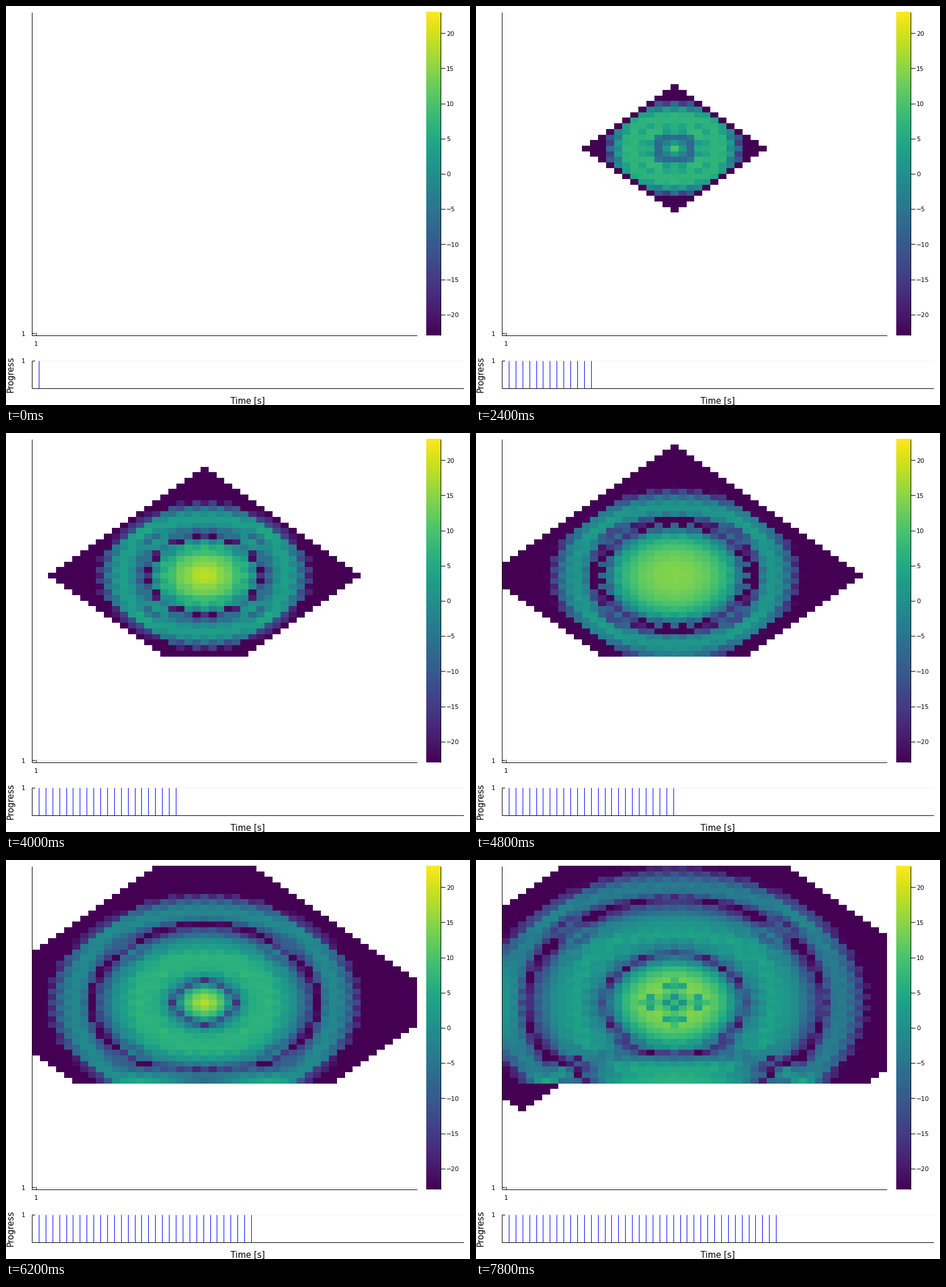
A matplotlib script that plays this animation: 806x694 px, repeating every 8 s.

```python
import numpy as np
import matplotlib.pyplot as plt
from matplotlib.animation import FuncAnimation

W, H, DPI = 806, 694, 100
PX = 72 / DPI
FRAMES, INTERVAL = 40, 200

# room: rows (from the bottom), columns, depth
ROWS, COLS, DEPTH = 58, 48, 46
SRC = (33, 21, 22)
SLICE = 24
WALL_ROW, GAP_COL = 18, 2
COURANT = 1 / np.sqrt(3)
PERIOD, GAIN, GROWTH = 33, 373, 0.015
LIMIT = 23

LEFT, RIGHT, TOP, BOTTOM = 45, 714, 10.5, 573.4
BAR_TOP, BAR_BOTTOM, BAR_RIGHT = 616.5, 665, 795
BAR_STEP = (BAR_RIGHT - LEFT) / 63


def burst(n):
    """One sine period with a slowly rising level."""
    if n >= PERIOD - 1:
        return 0.0
    level = GAIN * np.exp(GROWTH * (n - 16))
    return level * np.sin(2 * np.pi * (n + 1.05) / PERIOD)


def simulate():
    """Sound pressure level in one plane of the room for each frame."""
    p = np.zeros((ROWS, COLS, DEPTH))
    vel = [np.zeros_like(np.diff(p, axis=a)) for a in range(3)]
    wall = np.arange(COLS) != GAP_COL
    levels = []
    p[SRC] += burst(-1)
    for n in range(FRAMES):
        for a in range(3):
            vel[a] -= COURANT * np.diff(p, axis=a)
        vel[0][WALL_ROW, wall] = 0
        for a in range(3):
            p -= COURANT * np.diff(vel[a], axis=a, prepend=0, append=0)
        p[SRC] += burst(n)
        plane = np.abs(p[:, :, SLICE])
        plane = np.where(plane > 0, plane, np.nan)
        levels.append(np.ma.masked_invalid(20 * np.log10(plane)))
    levels[0][:] = np.ma.masked
    return levels


levels = simulate()

fig = plt.figure(figsize=(W / DPI, H / DPI), dpi=DPI, facecolor="white")
ax = fig.add_axes([0, 0, 1, 1])


def line(x0, y0, x1, y1, color="black", z=5):
    ax.plot([x0, x1], [y0, y1], color=color, lw=PX, zorder=z,
            solid_capstyle="butt")


def label(x, y, text, px=10.67, ha="center", **kw):
    ax.text(x, y, text, fontsize=px * PX, family="DejaVu Sans", ha=ha,
            va="center_baseline" if not kw else "center", color="black", **kw)


def picture(data, extent):
    return ax.imshow(data, extent=extent, origin="lower", aspect="auto",
                     cmap="viridis", vmin=-LIMIT, vmax=LIMIT,
                     interpolation="nearest", zorder=2)


heat = picture(levels[0], (LEFT, RIGHT, BOTTOM, TOP))
ramp = np.linspace(-LIMIT, LIMIT, 256)[:, None]
picture(ramp, (730, 754.5, BOTTOM, TOP))

# main axes
tick_x = LEFT + (RIGHT - LEFT) / COLS / 2
tick_y = BOTTOM - (BOTTOM - TOP) / ROWS / 2
FAINT = "#f2f2f2"
line(tick_x, TOP, tick_x, BOTTOM, FAINT, 1)
line(LEFT, tick_y, RIGHT, tick_y, FAINT, 1)
line(LEFT, TOP, LEFT, BOTTOM)
line(LEFT, BOTTOM, RIGHT, BOTTOM)
line(tick_x, BOTTOM, tick_x, BOTTOM - 5)
line(LEFT, tick_y, LEFT + 5, tick_y)
label(tick_x, 587, "1")
label(30.5, 569.5, "1")

# colour bar
line(754.5, TOP, 754.5, BOTTOM)
for v in range(-20, 21, 5):
    y = (TOP + BOTTOM) / 2 - v * (BOTTOM - TOP) / (2 * LIMIT)
    line(754.5, y, 763, y)
    label(765, y + 0.3, str(v).replace("-", "\u2212"), ha="left")

# progress axes
line(LEFT, BAR_TOP, BAR_RIGHT, BAR_TOP, FAINT, 1)
line(LEFT, BAR_TOP, LEFT, BAR_BOTTOM)
line(LEFT, BAR_BOTTOM, BAR_RIGHT, BAR_BOTTOM)
line(LEFT, BAR_TOP, LEFT + 5, BAR_TOP)
label(30.5, 617, "1")
label(420, 685.5, "Time [s]", 14.67)
label(8.5, 641, "Progress", 14.67, rotation=90)
bars = ax.vlines([], BAR_TOP, BAR_BOTTOM, colors="blue", lw=PX, zorder=4)

ax.set_xlim(0, W)
ax.set_ylim(H, 0)
ax.axis("off")


def update(n):
    heat.set_data(levels[n])
    xs = LEFT + BAR_STEP * np.arange(1, n + 2)
    bars.set_segments([[(x, BAR_TOP), (x, BAR_BOTTOM)] for x in xs])
    return heat, bars


anim = FuncAnimation(fig, update, frames=FRAMES, interval=INTERVAL,
                     init_func=lambda: update(0), repeat=True,
                     repeat_delay=0, blit=False)
plt.show()
```
